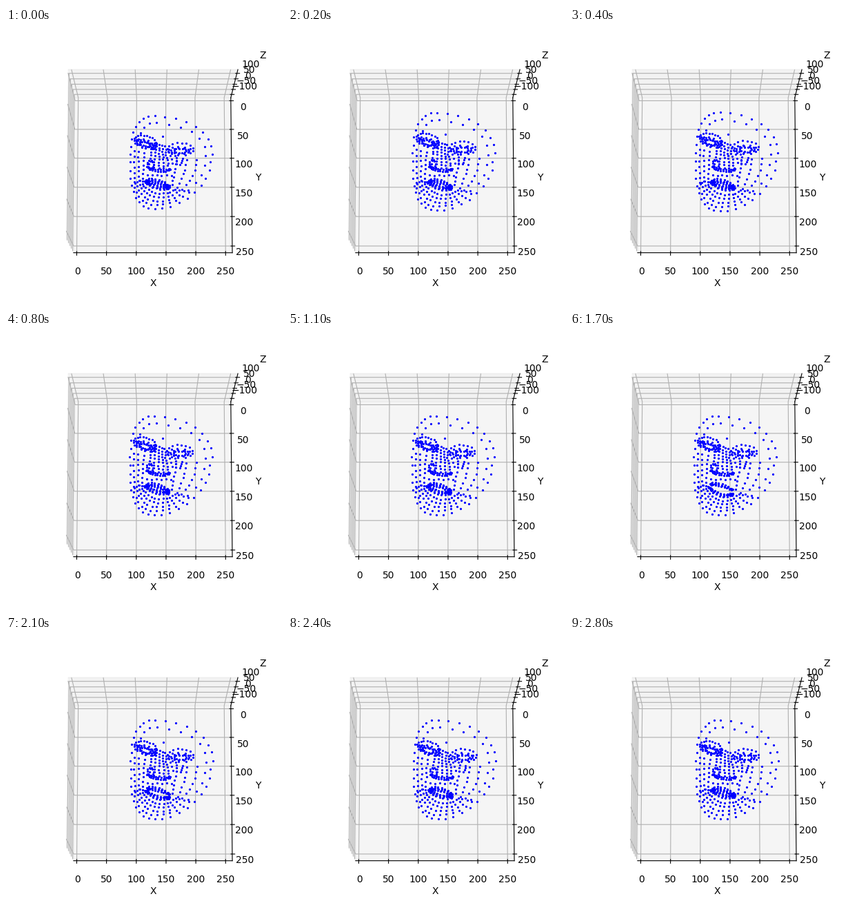
A matplotlib script for the animation above (2.9 s loop, 400x400 px).

```python
import numpy as np
import matplotlib.pyplot as plt
from matplotlib.animation import FuncAnimation

SIZE, DPI = 400, 100
FRAMES, INTERVAL = 29, 100


def arc(n, cx, cy, rx, ry, start=0, stop=360, tilt=0):
    """Points on an ellipse, angles in degrees, y pointing down."""
    t = np.radians(np.linspace(start, stop, n, endpoint=stop - start < 360))
    x, y = rx * np.cos(t), ry * np.sin(t)
    c, s = np.cos(np.radians(tilt)), np.sin(np.radians(tilt))
    return np.column_stack([cx + c * x - s * y, cy + s * x + c * y])


def contour(n, scale, start=0, stop=360):
    """Outline of the turned head, shrunk around its centre."""
    t = np.radians(np.linspace(start, stop, n, endpoint=stop - start < 360))
    c, s = np.cos(t), np.sin(t)
    temple = 24 * np.clip(-s, 0, 1) * np.clip(c, 0, 1)
    x = 58 * c - 22 * s ** 2 + temple
    return np.column_stack([238 + scale * x, 194.5 + scale * 67.5 * s])


def line(n, start, stop):
    return np.linspace(start, stop, n)


def sheet(a, b, steps):
    """Rows of points blended from curve a to curve b."""
    return np.vstack([a + (b - a) * t for t in steps])


def eye(n, cx, cy, width, tilt):
    rings = [arc(n, cx, cy, width * k, 3 * k, tilt=tilt)
             for k in (1, 1.5, 2)]
    brow = arc(n - 3, cx, cy, width * 2.2, 12, 195, 340, tilt)
    return np.vstack(rings + [brow])


def build_face():
    head = [contour(36, 1), contour(15, 0.85, -145, 45), [(227, 157)]]
    eyes = [eye(14, 201, 168, 8, 17), eye(11, 252, 178, 9, 0)]
    nose = [sheet(line(9, (214, 166), (206, 202)),
                  line(9, (230, 172), (236, 204)), np.linspace(0, 1, 5)),
            arc(10, 209, 198, 5, 6),
            sheet(arc(13, 221, 202, 17, 3, 170, 10, 7),
                  arc(13, 221, 202, 17, 6, 170, 10, 7), (0, 1)),
            sheet(line(4, (236, 180), (241, 196)),
                  line(4, (256, 189), (252, 198)), (0, 0.5, 1))]
    mouth = [arc(20, 219.5, 226, 14 + k, 1.6 * k, tilt=14)
             for k in range(1, 5)]
    mouth.append(line(6, (205, 213), (240, 214)))
    chin = sheet(arc(13, 220, 227, 19, 6, 0, 180, 14),
                 contour(13, 1, 42, 155), (0.2, 0.4, 0.6, 0.8))
    cheeks = [sheet(contour(7, 1, 195, 150), line(7, (202, 181), (200, 216)),
                    (0.25, 0.55, 0.9)),
              sheet(line(7, (247, 192), (241, 227)),
                    contour(7, 0.85, -5, 48), (0, 0.35, 0.7))]
    pts = np.vstack([*head, *eyes, *nose, *mouth, chin, *cheeks])
    return pts + np.random.default_rng(4).normal(0, 0.4, pts.shape)


FACE = build_face()


def bump(t, centre, width):
    return np.exp(-((t - centre) / width) ** 2)


def pose(t):
    """Stage positions of all dots at t seconds."""
    lift = 1 - np.exp(-t / 0.12)
    turn = np.clip((t - 1.7) / 1.0, 0, 1)
    sway = 2.6 * bump(t, 0.4, 0.2) + 3 * turn ** 2 * (3 - 2 * turn)
    mouth = 5 * bump(t, 1.7, 0.5)

    x, y = FACE.T
    below = y - (222 + 0.24 * (x - 203))
    width = np.clip(1 - ((x - 220) / 22) ** 2, 0, 1)
    lower = np.where(below > 0, np.clip(1 - below / 30, 0, 1), 0)
    upper = np.where(below <= 0, np.clip(1 + below / 8, 0, 1), 0)
    y = y + mouth * width * (lower - 0.4 * upper)
    return x + sway - 0.7 * lift, y + lift * (y - 212) * 0.065


# The axes square is as tall as the default one of a 480 px high figure.
side = 0.77 * 480
left, bottom = 23.2, 12.8
fig = plt.figure(figsize=(SIZE / DPI, SIZE / DPI), dpi=DPI)
ax = fig.add_axes([v / SIZE for v in (left, bottom, side, side)],
                  projection="3d")
pad = 256 / 48
ax.set_xlim(-pad, 256 + pad)
ax.set_ylim(256 + pad, -pad)
ax.set_zlim(-128 - pad, 128 + pad)
ax.set_xticks(range(0, 251, 50))
ax.set_yticks(range(0, 251, 50))
ax.set_zticks(range(-100, 101, 50))
ax.set_xlabel("X")
ax.set_ylabel("Y")
ax.set_zlabel("Z")
ax.view_init(elev=80, azim=-89.99)

# Flat layer in stage pixels for the landmark dots.
layer = fig.add_axes([0, 0, 1, 1])
layer.set_xlim(0, SIZE)
layer.set_ylim(SIZE, 0)
layer.axis("off")
dots, = layer.plot([], [], "o", color="blue", ms=2.3, mew=0)


def draw(frame):
    dots.set_data(*pose(frame * INTERVAL / 1000))
    return dots,


anim = FuncAnimation(fig, draw, frames=FRAMES, interval=INTERVAL,
                     repeat=True, repeat_delay=0)
plt.show()
```
